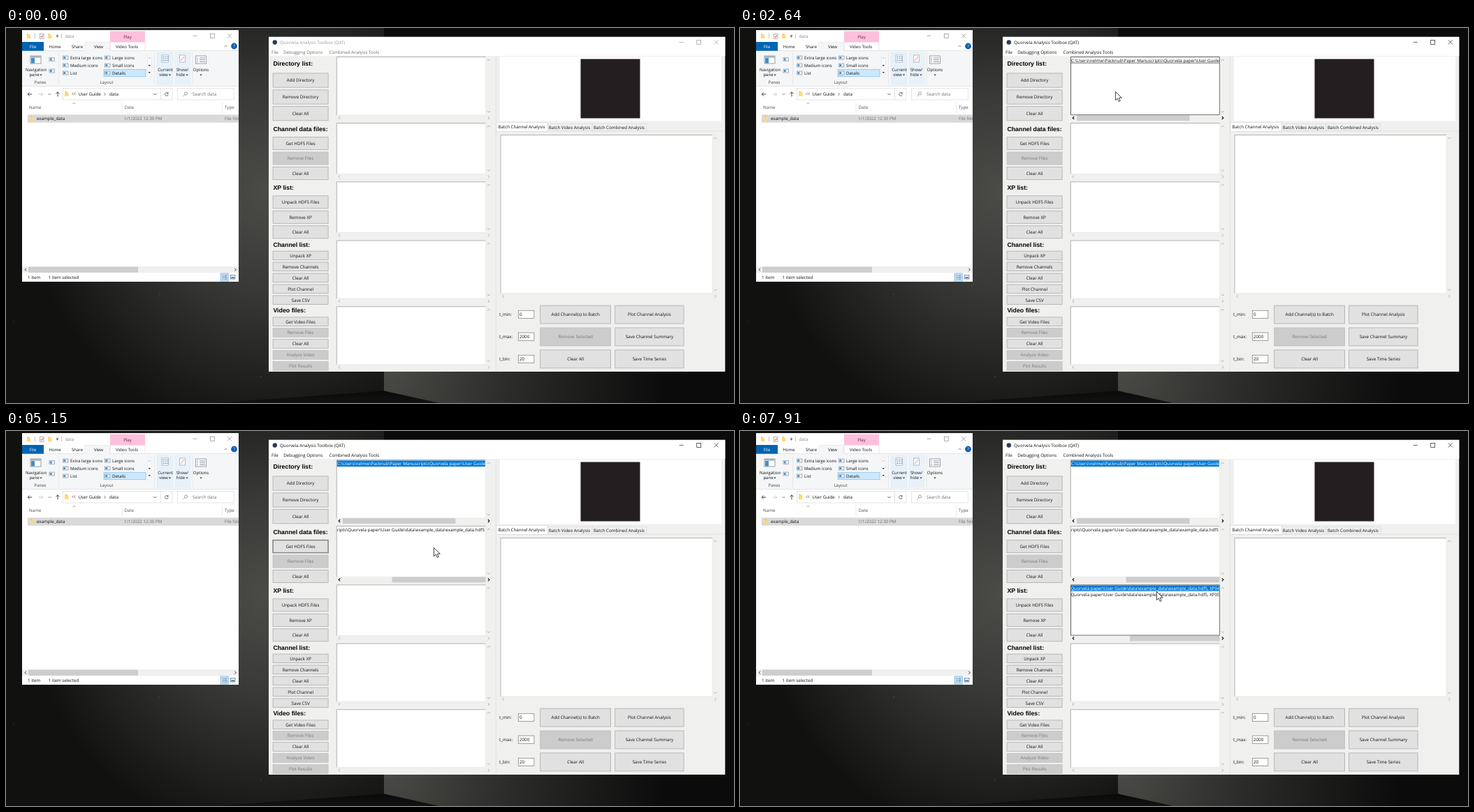
Recreate the animation shown at these times as an HTML page. Size 1042 by 538 pixels, loop 8 s.

```html
<!DOCTYPE html>
<html lang="en">
<head>
<meta charset="utf-8">
<title>Data import demo</title>
<style>
  html, body { margin: 0; width: 100%; height: 100%; overflow: hidden; background: #111; }
  svg { display: block; }
  #stage { width: 100%; height: 100%; }
  text {
    font: 6.22px "Open Sans", "Noto Sans", sans-serif;
    text-rendering: geometricPrecision;
    white-space: pre;
  }
  .ribbon text { font-size: 6.05px; }
  .head { font: bold 8.8px "Liberation Sans", Arial, sans-serif; }
</style>
</head>
<body>
<svg id="stage" viewBox="0 0 1042 538"></svg>
<script>
const LOOP = 8000;
const stage = document.getElementById('stage');

// ---- drawing helpers ----
const rect = (x, y, w, h, fill, stroke = 'none', sw = 0.7) =>
  `<rect x="${x}" y="${y}" width="${w}" height="${h}" fill="${fill}" stroke="${stroke}" stroke-width="${sw}"/>`;
const path = (d, stroke, sw = 0.7, fill = 'none') =>
  `<path d="${d}" fill="${fill}" stroke="${stroke}" stroke-width="${sw}"/>`;
const dot = (x, y, r, fill) => `<circle cx="${x}" cy="${y}" r="${r}" fill="${fill}"/>`;
const oval = (x, y, rx, ry, fill) => `<ellipse cx="${x}" cy="${y}" rx="${rx}" ry="${ry}" fill="${fill}"/>`;
const txt = (s, x, y, fill = '#111', extra = '') => `<text x="${x}" y="${y}" fill="${fill}" ${extra}>${s}</text>`;
const mid = (s, x, y, fill) => txt(s, x, y, fill, 'text-anchor="middle"');
const chev = (x, y, turn, color, sw = 0.9) =>
  `<path transform="translate(${x} ${y}) rotate(${turn})" d="M-2,1 0,-1 2,1" fill="none" stroke="${color}" stroke-width="${sw}"/>`;
const drop = (x, y, color = '#333') => path(`M${x - 1.7},${y - 0.9}h3.4l-1.7,1.9z`, 'none', 0, color);
const clip = (x, y, w, h, body) =>
  `<svg x="${x}" y="${y}" width="${w}" height="${h}" viewBox="${x} ${y} ${w} ${h}">${body}</svg>`;
const on = (from, to, body) => `<g data-from="${from}" data-to="${to}">${body}</g>`;
const folder = (x, y, w, h) =>
  rect(x, y, w * 0.5, h, '#e8b63c') + rect(x, y + h * 0.15, w, h * 0.85, '#ffda74');

// ---- backdrop: a dim room corner ----
function backdrop() {
  return `<defs>
    <radialGradient id="glow"><stop offset="0" stop-color="#4b4c48"/><stop offset=".4" stop-color="#393a37"/>
      <stop offset="1" stop-color="#393a37" stop-opacity="0"/></radialGradient>
    <radialGradient id="wall"><stop offset="0" stop-color="#4a4b47"/><stop offset=".45" stop-color="#2b2c29"/>
      <stop offset="1" stop-color="#0b0b0b"/></radialGradient>
    <linearGradient id="floor" x2="0" y2="1"><stop offset="0" stop-color="#0a0a0a"/><stop offset="1" stop-color="#121211"/></linearGradient>
  </defs>` +
    rect(0, 0, 1042, 538, '#111110') + oval(375, 235, 345, 350, 'url(#glow)') +
    clip(541, 0, 501, 538, rect(541, 0, 501, 538, '#0b0b0b') + oval(545, 490, 400, 380, 'url(#wall)')) +
    path('M300,538 541,520.5 620,538z', 'none', 0, 'url(#floor)') +
    dot(11, 421, 0.7, '#444') + dot(220, 382, 0.8, '#555') + dot(365, 500, 0.7, '#555');
}

// ---- file browser ----
function winButtons(x, gap, y, color) {
  return path(`M${x - 3},${y}h6`, color) + rect(x + gap - 3, y - 3, 6, 6, 'none', color) +
    path(`M${x + 2 * gap - 3},${y - 3}l6,6m0,-6l-6,6`, color);
}

function miniIcon(x, y) {
  return rect(x, y, 7.5, 5, '#e9eef3', '#7a8794', 0.6) + rect(x + 1, y + 1, 2.6, 3, '#4a90c8');
}

function ribbon() {
  const views = [
    ['Extra large icons', 92, 42.5], ['Medium icons', 92, 53.5], ['List', 92, 64.5],
    ['Large icons', 152, 42.5], ['Small icons', 152, 53.5], ['Details', 152, 64.5]];
  return '<g class="ribbon">' +
    rect(23, 20, 310, 12.5, '#fff') + rect(149, 4.5, 50, 16, '#fcc0dc') +
    mid('Play', 174, 15, '#5c2a43') +
    rect(23, 32.5, 310, 51, '#f5f6f7') + path('M23,32.5H113V20.5H148.5V32.5H333', '#dadbdc') +
    rect(113.4, 20.8, 34.8, 13, '#f5f6f7') + path('M149,20V32M199,20V32', '#ead3df') +
    rect(23, 20, 31, 12.7, '#0063b1') + mid('File', 38.5, 28.8, '#fff') +
    mid('Home', 70, 28.8) + mid('Share', 102, 28.8) + mid('View', 132.5, 28.8) + mid('Video Tools', 173, 28.8) +
    chev(314.5, 26, 0, '#777') + dot(326.5, 26, 4.4, '#0b5fae') + mid('?', 326.5, 28.2, '#fff') +
    path('M23,83.5H333', '#dadbdc') + path('M75.5,35V81M212.5,35V81M267,35V81', '#e0e2e4') +
    rect(35, 40, 15, 11, '#fff', '#6c7a88') + rect(35.5, 40.5, 14, 2, '#9aa7b4') + rect(36, 43, 5, 7.5, '#3f8ecb') +
    mid('Navigation', 43, 62) + mid('pane', 40.5, 69.3) + drop(50, 67.5) +
    miniIcon(62, 42.5) + miniIcon(62, 59) +
    mid('Panes', 49, 80, '#444') + mid('Layout', 144, 80, '#444') +
    rect(140, 59.3, 60, 10.4, '#cce8ff', '#84bfe9') +
    views.map(([s, x, y]) => miniIcon(x - 10.5, y - 2.5) + txt(s, x, y + 2.2)).join('') +
    rect(202.5, 38, 5.5, 32, '#f8f9fa', '#e0e2e4', 0.5) +
    drop(205.2, 54) + drop(205.2, 64) + path('M203.7,43.5l1.5,-1.7 1.5,1.7z', 'none', 0, '#bbb') +
    rect(216.5, 35, 22, 46, '#e6f1fa', '#d3e6f5', 0.5) + rect(242.5, 35, 21, 46, '#e9f2fa', '#d9e8f4', 0.5) +
    rect(223, 39, 9.5, 10, '#fff', '#8794a0', 0.6) +
    path('M224.5,41.5h2m1,0h2m1,0h1.5M224.5,44h2m1,0h2m1,0h1.5M224.5,46.5h2m1,0h2m1,0h1.5', '#4a7ea8', 0.9) +
    mid('Current', 228, 62) + mid('view', 225.5, 69.3) + drop(234.5, 67.5) +
    rect(248.5, 39, 8, 10, '#fff', '#8794a0', 0.6) + path('M250,47l5,-6', '#d66', 0.8) +
    mid('Show/', 252.5, 62) + mid('hide', 250, 69.3) + drop(259, 67.5) +
    rect(271.5, 40, 15, 11, '#fff', '#6c7a88') + path('M273,43h2m2,0h8M273,45.7h2m2,0h8M273,48.4h2m2,0h8', '#6c7a88', 0.8) +
    mid('Options', 279, 62) + drop(279, 67.5) + '</g>';
}

function browser() {
  const grey = '#6d6d6d';
  const row = (fill, edge) => rect(31, 124.3, 303, 11.4, fill, edge, 0.5);
  const files = row('#d9d9d9', 'none') + on(910, 1560, row('#cce8ff', '#99d1ff')) +
    folder(35, 126.5, 5, 6.5) + txt('example_data', 44, 132.2) +
    txt('1/1/2022 12:30 PM', 169, 132.2, grey) + txt('File folder', 313, 132.2, grey);
  return rect(23, 3, 310, 361, '#fff') +
    folder(30, 8.5, 5, 6.5) + path('M41.5,8v7M79.5,8v7', '#999', 0.6) +
    rect(48.5, 8.5, 5.5, 7, '#fff', '#888', 0.6) + path('M49.6,12l1.4,1.6 2.2,-3.4', '#c33', 0.9) +
    folder(60.5, 8.5, 5, 6.5) + drop(73.5, 12.5) + path('M71.8,10.3h3.4', '#333', 0.6) +
    txt('data', 84.5, 14, '#888') + winButtons(270.5, 24.8, 11.2, '#888') + ribbon() +
    path('M37.2,95h-6m2.6,-2.5l-2.6,2.5 2.6,2.5', '#333', 0.9) +
    path('M46.8,95h6m-2.6,-2.5l2.6,2.5 -2.6,2.5', '#c4c4c4', 0.9) + chev(62.5, 95, 180, '#555', 0.7) +
    path('M74,98.3v-6.5m-2.6,2.6l2.6,-2.6 2.6,2.6', '#333', 0.9) +
    rect(81.3, 86.5, 156.7, 16.5, '#fff', '#d9d9d9') + path('M221.5,86.5v16.5', '#d9d9d9') +
    folder(84.5, 91, 5, 7) + path('M96.6,92.5l-1.7,1.8 1.7,1.8m2.8,-3.6l-1.7,1.8 1.7,1.8', '#444', 0.7) +
    txt('User Guide', 103.5, 97.2) + chev(141.5, 95, 90, '#444', 0.7) + txt('data', 148, 97.2) +
    chev(213.5, 95, 180, '#444') + path('M231.8,93.4a2.4,2.4 0 1 0 .5,2.2m-.2,-3.4v1.8h-1.9', '#444', 0.8) +
    rect(245.3, 86.5, 81, 16.5, '#fff', '#d9d9d9') +
    '<circle cx="257.5" cy="94" r="2" fill="none" stroke="#777" stroke-width=".7"/>' + path('M256,95.5l-2.5,2.6', '#777') +
    txt('Search data', 267, 97.2, grey) +
    chev(97.5, 108, 0, '#777', 0.7) + path('M166,106.5v16M309.5,106.5v16', '#e3e3e3') +
    txt('Name', 33, 116.3, '#44546a') + txt('Date', 169.5, 116.3, '#44546a') + txt('Type', 313, 116.3, '#44546a') +
    clip(23, 120, 310, 20, files) +
    rect(23, 342, 310, 9.3, '#f0f0f0') + rect(32, 342.5, 157, 8.3, '#cdcdcd') +
    chev(28, 346.7, -90, '#333', 1) + chev(328.3, 346.7, 90, '#333', 1) +
    txt('1 item', 31, 360) + txt('1 item selected', 60.5, 360) +
    rect(307.2, 352, 11, 11, '#cce8ff', '#5ea7e0') +
    path('M309.5,355h2m1,0h4M309.5,357.5h2m1,0h4M309.5,360h2m1,0h4', '#456', 0.8) +
    rect(321.5, 354.5, 6.5, 5.5, '#eef3f7', '#667') + rect(322.5, 357, 4.5, 2.3, '#4a90c8');
}

// ---- analysis window ----
const MODES = {
  normal: ['#e1e1e1', '#adadad', 0.8, '#111'],
  off: ['#cccccc', '#bfbfbf', 0.8, '#787878'],
  hover: ['#e5f1fb', '#0078d7', 0.9, '#111'],
  down: ['#cce4f7', '#005499', 0.9, '#111'],
  focus: ['#e1e1e1', '#868686', 1.5, '#111'],
};
function button(s, x, y, w, h, mode = 'normal') {
  const [fill, edge, sw, ink] = MODES[mode];
  return rect(x + 0.4, y + 0.4, w - 0.8, h - 0.8, fill, edge, sw) + mid(s, x + w / 2, y + h / 2 + 2.3, ink);
}
const side = (s, cy, h, mode) => button(s, 381.7, cy - h / 2, 79.8, h, mode);

// heading, baseline, button height, [label, centre, disabled]
const GROUPS = [
  ['Directory list:', 54.4, 21, [['Add Directory', 75], ['Remove Directory', 99], ['Clear All', 122.7]]],
  ['Channel data files:', 147.6, 18.8, [['Get HDF5 Files', 165.6], ['Remove Files', 187, 1], ['Clear All', 208.5]]],
  ['XP list:', 231.8, 18.8, [['Unpack HDF5 Files', 249.8], ['Remove XP', 271.3], ['Clear All', 292.8]]],
  ['Channel list:', 313.8, 13.4, [['Unpack XP', 326.4], ['Remove Channels', 342.3], ['Clear All', 358.3], ['Plot Channel', 374.3], ['Save CSV', 390.2]]],
  ['Video files:', 408.4, 13.4, [['Get Video Files', 421.2], ['Remove Files', 437, 1], ['Clear All', 453], ['Analyze Video', 469, 1], ['Plot Results', 485, 1]]],
];
const LISTS = [[41.5, 125], [136.5, 209.3], [220.8, 293.4], [305, 388], [399.7, 482.7]];

function listBox(x, y, r, b) {
  const c = '#a9a9a9';
  return rect(x, y, r - x, b - y, '#fff') + path(`M${x},${b}V${y}H${r}`, '#a0a0a0', 0.8) +
    path(`M${x},${b}H${r}V${y}`, '#e3e3e3', 0.6) +
    chev(r + 4.4, y + 4.6, 0, c) + chev(r + 4.4, b - 5, 180, c) +
    chev(x + 3.7, b + 4, -90, c) + chev(r + 4.4, b + 4, 90, c);
}
function hScroll(i, from, to) {
  const y = LISTS[i][1] + 4;
  return rect(from, y - 4, to - from, 8, '#cdcdcd') + chev(477.2, y, -90, '#111', 1.1) + chev(690.9, y, 90, '#111', 1.1);
}
function ring(i) {
  const [y, b] = LISTS[i];
  return rect(473.7, y + 0.2, 212.6, b - y - 0.6, 'none', '#444', 0.7);
}
function item(s, y, { x = 474, picked = false, active = false } = {}) {
  const ink = picked ? '#fff' : '#111';
  return clip(473.5, y, 212.3, 9.2, (picked ? rect(473.5, y, 213, 9, '#0078d7') : '') +
    txt(s, x, y + 6.7, ink) + (active ? path(`M474,${y + 8}H686`, ink, 0.6) : ''));
}

const DOCS = 'Quorvela paper\\User Guide\\data\\example_data';
const FILE = DOCS + '\\example_data.hdf5';

function listContent() {
  const dir = 'C:\\Users\\nelmw\\Packnub\\Paper Manuscripts\\' + DOCS;
  const data = 'ripts\\' + FILE;
  const [y1, y2, y3] = [42.2, 137.2, 221.4];
  const picked = true, active = true;
  return on(2640, LOOP, hScroll(0, 482, 643.5)) +
    on(2640, 3820, item(dir, y1, { active })) +
    on(3820, 4490, item(dir, y1, { picked, active })) +
    on(4490, LOOP, item(dir, y1, { picked })) +
    on(2090, 4490, ring(0)) +
    on(4740, LOOP, hScroll(1, 552.5, 686.5)) +
    on(4740, 5670, item(data, y2)) +
    on(5670, 6590, item(data, y2, { picked, active }) + ring(1)) +
    on(6590, 7780, item(data, y2, { picked })) +
    on(7780, LOOP, item(data, y2)) +
    on(6720, LOOP, hScroll(2, 558, 686.5) + item(FILE + ', XP05', y3 + 8.8, { x: 473.5 })) +
    on(6720, 7780, item(FILE + ', XP04', y3, { x: 473.5 })) +
    on(7780, LOOP, item(FILE + ', XP04', y3, { x: 473.5, picked, active }) + ring(2));
}

function buttonStates() {
  const get = mode => side('Get HDF5 Files', 165.6, 18.8, mode);
  const unpack = mode => side('Unpack HDF5 Files', 249.8, 18.8, mode);
  return on(4210, 4490, get('hover')) + on(4490, 4740, get('down')) + on(4740, 5670, get('focus')) +
    on(5670, 7780, side('Remove Files', 187, 18.8)) +
    on(6190, 6590, unpack('hover')) + on(6590, 6720, unpack('down')) + on(6720, 7780, unpack('focus'));
}

function batchPanel() {
  const fields = [['t_min:', '0', 411], ['t_max:', '2000', 442.8], ['t_bin:', '20', 475]];
  const labels = ['Add Channel(s) to Batch', 'Plot Channel Analysis', 'Remove Selected',
    'Save Channel Summary', 'Clear All', 'Save Time Series'];
  return path('M701.3,40.5V492.5', '#dcdcdc') + rect(707, 41, 317, 92.5, '#fff') +
    rect(822.5, 44.5, 85, 85, '#231f20') +
    path('M702,148H1029', '#dcdcdc') + rect(775, 137.2, 64, 10.6, '#f0f0f0', '#d9d9d9') +
    rect(839, 137.2, 78, 10.6, '#f0f0f0', '#d9d9d9') + rect(702, 135.6, 73, 12.8, '#fff', '#d9d9d9') +
    txt('Batch Channel Analysis', 704.5, 144) + txt('Batch Video Analysis', 776.8, 144.8) +
    txt('Batch Combined Analysis', 841, 144.8) + listBox(708, 153.5, 1011, 380.7) +
    fields.map(([name, value, y]) => txt(name, 706, y + 1.9) +
      rect(733.3, y - 5.7, 22.6, 11.2, '#fff', '#7a7a7a') + txt(value, 735, y + 2)).join('') +
    labels.map((s, i) => {
      const y = 397.7 + (i >> 1) * 31.9;
      return i % 2 ? button(s, 871.3, y, 99.2, 26.8) : button(s, 764.3, y, 101.7, 26.8, i === 2 ? 'off' : 'normal');
    }).join('');
}

function toolbox() {
  const bar = (title, menu, ctl) => txt('Quorvela Analysis Toolbox (QAT)', 392, 23.1, title) +
    txt('File', 380, 36.9, menu) + txt('Debugging Options', 397.3, 36.9, menu) +
    txt('Combined Analysis Tools', 462.5, 36.9, menu) + winButtons(966.7, 25, 20.4, ctl);
  return rect(376, 12.8, 653.3, 480.2, '#f0f0ee') + rect(376, 12.8, 653.3, 27.2, '#fff') +
    dot(384.8, 20.5, 3.2, '#2d3b55') +
    on(0, 2090, bar('#999', '#6d6d6d', '#999')) + on(2090, LOOP, bar('#111', '#111', '#222')) +
    GROUPS.map(([title, base, h, items]) => txt(title, 382.4, base, '#000', 'class="head"') +
      items.map(([s, cy, off]) => side(s, cy, h, off ? 'off' : 'normal')).join('')).join('') +
    LISTS.map(([y, b]) => listBox(473.3, y, 686.5, b)).join('') +
    batchPanel() + listContent() + buttonStates();
}

// ---- pointer, drawn with its tip at 0,0 ----
function pointer() {
  const halo = `<g opacity=".85">${dot(0, 0.6, 9.2, '#f2ee4a')}</g>`;
  const ghost = '<g opacity=".6">' + folder(-24, -66, 48, 50) + '</g>' +
    rect(8, 15, 25, 9.5, '#fff', '#aaa', 0.5) + txt('+ Copy', 10.5, 22, '#1a4f9c');
  const presses = [[1430, 2090], [4490, 4620], [5670, 5800], [6590, 6720], [7780, 7910]];
  return on(260, LOOP, '<g id="pointer">' +
    presses.map(([from, to]) => on(from, to, halo)).join('') + on(1560, 2090, ghost) +
    path('M.4,.4V12.6L3.2,10 5.2,14.4 7.2,13.5 5.3,9.2H9.3z', '#111', 0.8, '#fff') + '</g>');
}

// Each pose holds until the next: [time of first pose, [x, y], ...] at 130 ms steps.
const MOVES = [
  [260, [596, 292], [545, 262], [450, 215], [340, 172], [235, 145], [175, 134], [158, 129]],
  [1560, [172, 129]],
  [1700, [270, 118], [420, 99], [526, 91], [537, 91]],
  [3040, [537, 84], [537, 68], [537, 50], [537, 39], [537, 43]],
  [3950, [525, 60], [470, 125], [440, 164]],
  [4890, [475, 195], [560, 215], [612, 167], [616, 155], [618, 146], [618, 142]],
  [5800, [600, 165], [540, 225], [470, 262], [446, 260], [440, 251]],
  [6720, [455, 258], [520, 275], [575, 290], [600, 280], [604, 255], [602, 240]],
  [7520, [599, 236], [597, 232], [596, 230]],
];
function tip(t) {
  const [start, ...poses] = MOVES.filter(m => m[0] <= t).pop() || MOVES[0];
  const i = Math.max(0, Math.floor((t - start) / 130));
  return poses[Math.min(i, poses.length - 1)];
}

stage.innerHTML = backdrop() + browser() + toolbox() + pointer();
const timed = [...stage.querySelectorAll('[data-from]')].map(el => [el, +el.dataset.from, +el.dataset.to]);
const arrow = document.getElementById('pointer');
const begin = performance.now();

function draw() {
  const t = (performance.now() - begin) % LOOP;
  for (const [el, from, to] of timed) el.style.display = t >= from && t < to ? '' : 'none';
  arrow.setAttribute('transform', `translate(${tip(t)})`);
  requestAnimationFrame(draw);
}
draw();
</script>
</body>
</html>
```
